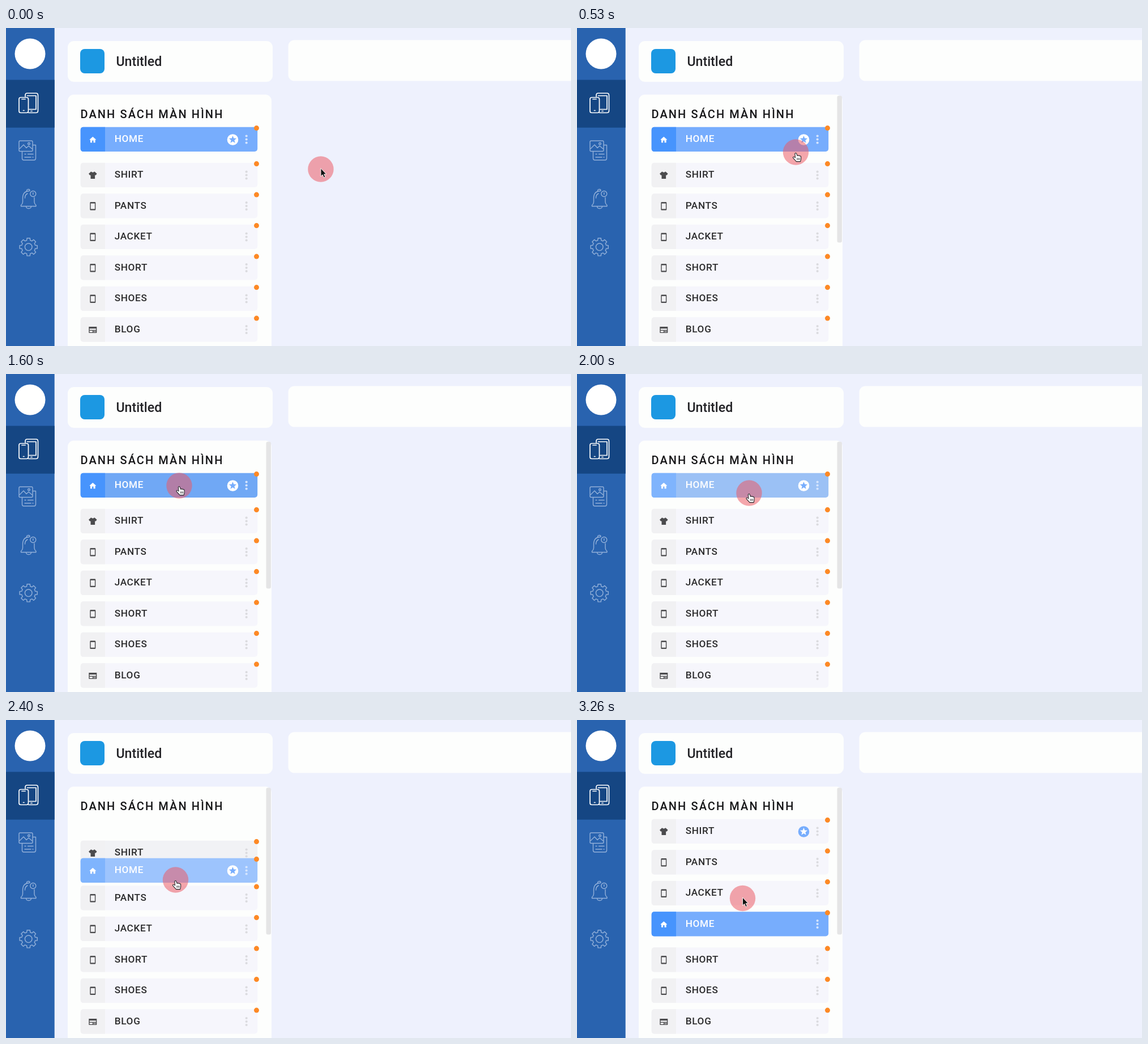
An HTML page for the animation above (4.6 s loop, 998 by 561 pixels).

```html
<!DOCTYPE html>
<html lang="vi">
<head>
<meta charset="utf-8">
<title>Danh sách màn hình</title>
<style>
html, body { margin: 0; width: 100%; height: 100%; overflow: hidden; background: #eef1fd; }
svg { display: block; width: 100%; height: 100%; }
text { font-family: Roboto, sans-serif; font-weight: 500; }
.label { font-size: 17.2px; letter-spacing: .65px; fill: #2b2b2c; }
.line { fill: none; stroke: #92b0d9; stroke-width: 1.4; stroke-linecap: round; stroke-linejoin: round; }
.on { stroke: #fff; stroke-width: 1.7; }
.glyph { fill: #4b4b4d; }
.cell { fill: #f1f1f3; }
.bg { fill: #f6f6fc; }
.more { fill: #dbdbdf; }
.home .label, .home .glyph { fill: #fff; }
.home .more { fill: #d5e5fe; }
.home .cell { fill: #4794fd; }
.drag .cell { fill: #7fb4fd; }
</style>
</head>
<body>
<svg id="stage" viewBox="0 0 998 561">
  <defs>
    <g id="house"><path transform="translate(-7.4 -7) scale(.617)" d="M10 20v-6h4v6h5v-8h3L12 3 2 12h3v8z"/></g>
    <g id="tee"><path d="M-3-6.5Q0-3.8 3-6.5L7.3-2.8 5 .2 3.8-.5V6.2H-3.8V-.5L-5 .2-7.3-2.8z"/></g>
    <g id="phone"><path fill-rule="evenodd" d="M-3.6-7.3H3.6Q5-7.3 5-5.9V5.9Q5 7.3 3.6 7.3H-3.6Q-5 7.3-5 5.9V-5.9Q-5-7.3-3.6-7.3zM-3.6-4.9V4.9H3.6V-4.9z"/></g>
    <g id="news"><path fill-rule="evenodd" d="M-7-5.2H7V4.6Q7 5.8 5.8 5.8H-5.8Q-7 5.8-7 4.6zM-5.6-2V.5H5.6V-2zM-5.6 1.7V4.4H-.4V1.7zM.8 1.7V2.5H5.6V1.7zM.8 3.6V4.4H5.6V3.6z"/></g>
  </defs>

  <path fill="#2963af" d="M0 0H85.700V561H0z"/>
  <path fill="#154683" d="M0 91.600H85.700V175.800H0z"/>
  <circle cx="42.500" cy="45.500" r="27" fill="#fff"/>

  <g class="line on">
    <path d="M34 121V118.500Q34 115 37.500 115H53Q56.500 115 56.500 118.500V146Q56.500 149.500 53 149.500H40M37.500 119.500H53V143.500H41"/>
    <rect x="23" y="122.500" width="16.500" height="27" rx="3"/>
    <path d="M28 125.500H34M30.500 145.500H32M44 146.500H46"/>
  </g>
  <g class="line">
    <path d="M28.500 218V230Q28.500 233 31.500 233H49.500Q52.500 233 52.500 230V206.500H47.500"/>
    <rect x="23" y="199" width="24" height="18.500" rx="2"/>
    <path d="M24 213L31 206 36 211.500 40 208 46.500 213.500M33 222.500H35M38.500 222.500H48M33 228H44M47 228H48"/>
    <circle cx="40.500" cy="204" r="1.800"/>
  </g>
  <g class="line">
    <path d="M41 287.500Q29.500 288 29.500 300V307Q29.500 310 26.500 312.500V314.500H53V312.500Q50 310 50 307V299M36.500 288V286.500Q37 284.500 39.500 284.500T42 287M35.500 315Q36 318.500 40 318.500T44.500 315M33.500 300Q33.500 294 38 292"/>
    <circle cx="47.800" cy="292.500" r="5"/>
    <path d="M47.800 290.500V293.500"/>
  </g>
  <g class="line" transform="translate(39.700 386.300)"><path id="gear"/><circle r="6.300"/></g>

  <g fill="#fdfefd">
    <rect x="109" y="23" width="362" height="72" rx="11"/>
    <rect x="498.500" y="21.300" width="520" height="72.200" rx="11"/>
    <rect x="109" y="117.500" width="360" height="470" rx="11"/>
  </g>
  <rect x="131" y="37" width="43" height="43" rx="8" fill="#1c98e2"/>
  <text x="194.400" y="67" font-size="23.200" fill="#222226">Untitled</text>
  <text x="131.500" y="158.900" font-size="20" letter-spacing="2.080" fill="#161618">DANH SÁCH MÀN HÌNH</text>
  <rect id="scrollbar" x="459.500" y="119.500" width="8.500" height="259" rx="3" fill="#e5e5e6"/>
  <g id="list"></g>
  <g id="pointer">
    <circle r="22.700" fill="#ec5a62" fill-opacity=".53"/>
    <path id="arrow" d="M0-1.500V12.700L3.200 9.800 5.500 15 8 13.900 5.700 8.900H9.900z" fill="#111" stroke="#fff" stroke-width=".9"/>
    <g id="hand" transform="translate(-.8 .8)" fill="#fff" stroke="#26262a" stroke-width="1.100" stroke-linejoin="round">
      <path d="M-.8 1.800Q.8-.5 2 1.800L3.400 5.500Q5 4.200 6 5.600 7.400 4.700 8.100 6.200 9.500 5.600 9.900 7.200V11.500L8.900 15.800H1.800L-2.800 10.800Q-5.200 8.500-3.500 7.600-2.300 7.200-.2 9z"/>
      <path d="M3.200 9.500V13M5.300 9.500V13M7.400 9.500V13" fill="none" stroke-width=".9"/>
    </g>
  </g>
</svg>
<script>
const $ = id => document.getElementById(id);
const LOOP = 4600, DROP = 49, PITCH = 54.5;

// Each row of a track is [step, value, ...]; slopes are limited so nothing overshoots.
const path = [
  [0, 556, 249], [1, 551, 248.4], [4, 490, 239], [8, 386.5, 219], [11, 336, 204.5], [15, 306, 196.5],
  [23, 306, 196.5], [24, 306, 197], [27, 305.3, 201], [30, 304, 210], [31, 303.3, 216], [32, 302.5, 225],
  [34, 301, 249], [36, 299.5, 282], [38, 296.5, 301], [40, 293.5, 311.5], [42, 292.5, 314.5]
];
const homeY = [[30, 175], [31, 188], [32, 196], [34, 215], [36, 244], [37, 263], [39, 288], [40, 290], [42, 293]];
const lift = [[34, 0], [35, 10], [36, 25], [37, 38], [38, 42], [39, 43]];

function track(keys, n, col = 1) {
  const last = keys.length - 1;
  if (n <= keys[0][0]) return keys[0][col];
  if (n >= keys[last][0]) return keys[last][col];
  const i = keys.findIndex(k => k[0] > n) - 1;
  const slope = j => j < 0 || j >= last ? 0 : (keys[j + 1][col] - keys[j][col]) / (keys[j + 1][0] - keys[j][0]);
  const tangent = j => {
    const a = slope(j - 1), b = slope(j);
    return a * b > 0 ? 2 * a * b / (a + b) : 0;
  };
  const h = keys[i + 1][0] - keys[i][0], u = (n - keys[i][0]) / h;
  const s = u * u * (3 - 2 * u);
  return keys[i][col] * (1 - s) + keys[i + 1][col] * s
    + h * u * (1 - u) * ((1 - u) * tangent(i) - u * tangent(i + 1));
}

function starPath(r) {
  return 'M' + Array.from({ length: 10 }, (_, i) => {
    const a = i * Math.PI / 5, d = i % 2 ? r * .43 : r;
    return `${(d * Math.sin(a)).toFixed(2)} ${(-d * Math.cos(a)).toFixed(2)}`;
  }).join('L') + 'z';
}

function gearPath() {
  const points = [];
  for (let i = 0; i < 8; i++) {
    for (const [offset, r] of [[-.25, 12.2], [-.17, 15.8], [.17, 15.8], [.25, 12.2]]) {
      const a = i * Math.PI / 4 + offset;
      points.push(`${(r * Math.sin(a)).toFixed(2)} ${(-r * Math.cos(a)).toFixed(2)}`);
    }
  }
  return 'M' + points.join('L') + 'z';
}

function makeRow(name, icon) {
  const g = document.createElementNS('http://www.w3.org/2000/svg', 'g');
  const badge = `<g class="badge" transform="translate(400.5 22)"><circle r="9.8"/><path d="${starPath(7)}"/></g>`;
  const more = [15.5, 21.5, 27.5].map(y => `<circle class="more" cx="424.7" cy="${y}" r="2.1"/>`).join('');
  g.innerHTML = `<rect class="bg" x="131.7" y="-.3" width="312.5" height="43.2" rx="5"/>
    <path class="cell" d="M175-.3V42.900H136.700Q131.700 42.900 131.700 37.900V4.700Q131.700-.3 136.700-.3z"/>
    <use class="glyph" href="#${icon}" x="153.3" y="21.8"/>
    <text class="label" x="191.7" y="26.1">${name}</text>${more}${badge}
    <circle cx="442.5" cy="1.6" r="4.5" fill="#fd8925"/>`;
  return { g, bg: g.querySelector('.bg'), badge: g.querySelector('.badge') };
}

const show = (el, on) => el.setAttribute('visibility', on ? 'visible' : 'hidden');
const place = (el, x, y) => el.setAttribute('transform', `translate(${x.toFixed(2)} ${y.toFixed(2)})`);
function paintBadge(row, disc, star) {
  row.badge.children[0].setAttribute('fill', disc);
  row.badge.children[1].setAttribute('fill', star);
}

$('gear').setAttribute('d', gearPath());
const items = [['SHIRT', 'tee'], ['PANTS', 'phone'], ['JACKET', 'phone'], ['SHORT', 'phone'], ['SHOES', 'phone'], ['BLOG', 'news']]
  .map(([name, icon]) => makeRow(name, icon));
const home = makeRow('HOME', 'house');
$('list').append(...items.map(r => r.g), home.g);
paintBadge(home, '#fff', '#77adfd');
paintBadge(items[0], '#77adfd', '#fff');

function homeColor(n) {
  if (n >= DROP) return '#77adfd';
  if (n >= 31) return '#9dc4fd';
  if (n >= 28) return '#9bc1f5';
  const u = Math.min(1, Math.max(0, (n - 8) / 3));
  return `rgb(${119 - 7 * u} ${173 - 5 * u} ${253 - 8 * u})`;
}

function draw(n) {
  const dropped = n >= DROP, dragging = n >= 28 && !dropped;
  items.forEach((row, i) => {
    const up = i < 2 ? track(lift, n - 3 * i) : 0;
    const y = dropped && i < 3 ? 175 + PITCH * i : 238 + PITCH * i - up;
    place(row.g, 0, y);
    row.bg.style.fill = !dropped && up > 0 && up < 42 ? '#f1f2f5' : '';
    show(row.badge, dropped && i === 0);
  });
  place(home.g, 0, dropped ? 175 + PITCH * 3 : track(homeY, n));
  home.g.setAttribute('class', dragging ? 'home drag' : 'home');
  home.bg.style.fill = homeColor(n);
  show(home.badge, !dropped);

  const x = track(path, n, 1), y = track(path, n, 2);
  const pointing = x < 430 && n < 45;
  place($('pointer'), x, y);
  show($('hand'), pointing);
  show($('arrow'), !pointing);
  show($('scrollbar'), x < 469);
}

// The picture moves 15 times a second, on times rounded down to 10 ms.
function stepAt(t) {
  const n = Math.floor(t * 3 / 200) + 1;
  return Math.floor(n * 20 / 3) * 10 > t ? n - 1 : n;
}

const start = performance.now();
function tick() {
  draw(stepAt((performance.now() - start) % LOOP));
  requestAnimationFrame(tick);
}
tick();
</script>
</body>
</html>
```
